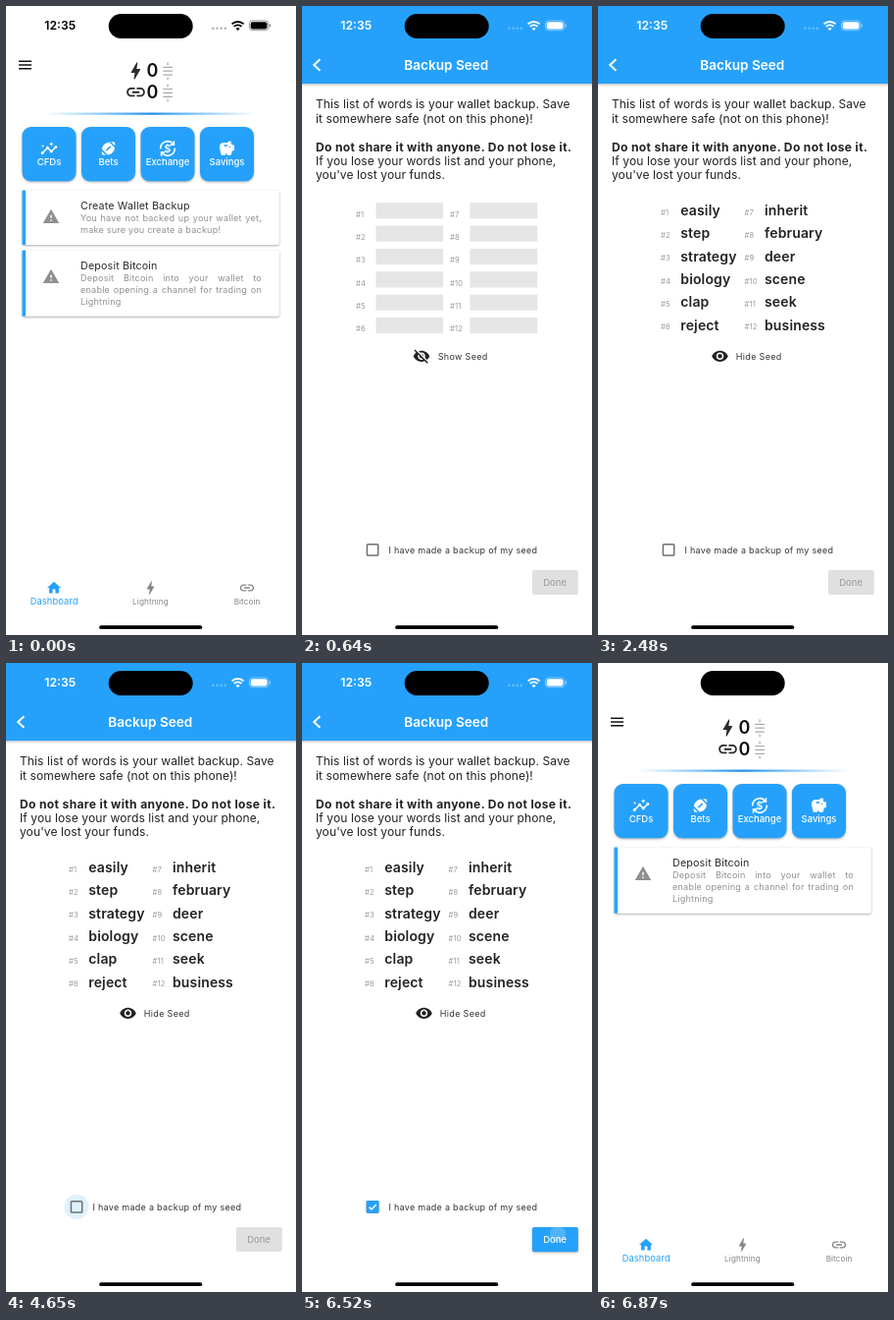
Animation of 296x640 px, one loop 7.97 s. Source, as an HTML page:

```html
<!DOCTYPE html>
<html lang="en">
<head>
<meta charset="utf-8">
<title>Wallet backup</title>
<style>
html, body { margin: 0; width: 100%; height: 100%; overflow: hidden; background: #fff; }
svg { display: block; width: 296px; height: 640px; font-family: Inter, Roboto, sans-serif; }
.body { font: 9.1px/11.7px Inter, Roboto, sans-serif; letter-spacing: .2px; color: #919191; }
.body p { margin: 0; text-align: justify; text-align-last: justify; }
.body p:last-child { text-align-last: left; }
.tile { filter: drop-shadow(0 1px 1.2px rgba(0,0,0,.32)); }
.card { filter: drop-shadow(.3px 1px 1px rgba(0,0,0,.33)); }
.bar { filter: drop-shadow(0 1.5px 1.5px rgba(0,0,0,.28)); }
</style>
</head>
<body>
<svg id="stage" viewBox="0 0 296 640"></svg>
<script>
const BLUE = '#26a1fb', INK = '#2b2b2b', GREY = '#909090';
const LOOP = 7970;

const ICONS = {
  trend: 'M21 8c-1.45 0-2.26 1.44-1.93 2.51l-3.55 3.56c-.3-.09-.74-.09-1.04 0l-2.55-2.55C12.27 10.45 11.46 9 10 9c-1.45 0-2.27 1.44-1.93 2.52l-4.56 4.55C2.44 15.74 1 16.55 1 18c0 1.1.9 2 2 2 1.45 0 2.26-1.44 1.93-2.51l4.55-4.56c.3.09.74.09 1.04 0l2.55 2.55C12.73 16.55 13.54 18 15 18c1.45 0 2.27-1.44 1.93-2.52l3.56-3.55C21.56 12.26 23 11.45 23 10c0-1.1-.9-2-2-2zM15 9l.94-2.07L18 6l-2.06-.93L15 3l-.92 2.07L12 6l2.08.93zM3.5 11L4 9l2-.5L4 8l-.5-2L3 8l-2 .5L3 9z',
  ball: 'M3.02 15.62c-.08 2.42.32 4.34.67 4.69s2.28.76 4.69.67l-5.36-5.36zM13.08 3.28C10.75 3.7 8.29 4.62 6.46 6.46s-2.76 4.29-3.18 6.62l7.63 7.63c2.34-.41 4.79-1.34 6.62-3.18s2.76-4.29 3.18-6.62l-7.63-7.63zM9.9 15.5l-1.4-1.4 5.6-5.6 1.4 1.4-5.6 5.6zM20.98 8.38c.08-2.42-.32-4.34-.67-4.69s-2.28-.76-4.69-.67l5.36 5.36z',
  pig: 'M19.83 7.5l-2.27-2.27c.07-.42.18-.81.32-1.15.08-.18.12-.37.12-.58 0-.83-.67-1.5-1.5-1.5-1.64 0-3.09.79-4 2h-5C4.46 4 2 6.46 2 9.5S4.5 21 4.5 21H10v-2h2v2h5.5l1.68-5.59 2.82-.94V7.5h-2.17zM13 9H8V7h5v2zm3 2c-.55 0-1-.45-1-1s.45-1 1-1 1 .45 1 1-.45 1-1 1z',
  warn: 'M1 21h22L12 2 1 21zm12-3h-2v-2h2v2zm0-4h-2v-4h2v4z',
  bolt: 'M11 21h-1l1-7H7.5c-.58 0-.57-.32-.38-.66l.07-.12C8.48 10.94 10.42 7.54 13 3h1l-1 7h3.5c.49 0 .56.33.47.51l-.07.15C12.96 17.55 11 21 11 21z',
  link: 'M3.9 12c0-1.71 1.39-3.1 3.1-3.1h4V7H7c-2.76 0-5 2.24-5 5s2.24 5 5 5h4v-1.9H7c-1.71 0-3.1-1.39-3.1-3.1zM8 13h8v-2H8v2zm9-6h-4v1.9h4c1.71 0 3.1 1.39 3.1 3.1s-1.39 3.1-3.1 3.1h-4V17h4c2.76 0 5-2.24 5-5s-2.24-5-5-5z',
  home: 'M10 20v-6h4v6h5v-8h3L12 3 2 12h3v8z',
  eye: 'M12 4.5C7 4.5 2.73 7.61 1 12c1.73 4.39 6 7.5 11 7.5s9.27-3.11 11-7.5c-1.73-4.39-6-7.5-11-7.5zM12 17c-2.76 0-5-2.24-5-5s2.24-5 5-5 5 2.24 5 5-2.24 5-5 5zm0-8c-1.66 0-3 1.34-3 3s1.34 3 3 3 3-1.34 3-3-1.34-3-3-3z',
  eyeOff: 'M12 7c2.76 0 5 2.24 5 5 0 .65-.13 1.26-.36 1.83l2.92 2.92c1.51-1.26 2.7-2.89 3.43-4.75-1.73-4.39-6-7.5-11-7.5-1.4 0-2.74.25-3.98.7l2.16 2.16C10.74 7.13 11.35 7 12 7zM2 4.27l2.28 2.28.46.46C3.08 8.3 1.78 10.02 1 12c1.73 4.39 6 7.5 11 7.5 1.55 0 3.03-.3 4.38-.84l.42.42L19.73 22 21 20.73 3.27 3 2 4.27zM7.53 9.8l1.55 1.55c-.05.21-.08.43-.08.65 0 1.66 1.34 3 3 3 .22 0 .44-.03.65-.08l1.55 1.55c-.67.33-1.41.53-2.2.53-2.76 0-5-2.24-5-5 0-.79.2-1.53.53-2.2zm4.31-.78l3.15 3.15.02-.16c0-1.66-1.34-3-3-3l-.17.01z'
};

const icon = (name, cx, cy, fill, k = .753) =>
  `<path d="${ICONS[name]}" fill="${fill}" transform="translate(${cx} ${cy}) scale(${k}) translate(-12 -12)"/>`;

const text = (s, x, y, size, fill, { w = 400, ls = 0, mid = false } = {}) =>
  `<text x="${x}" y="${y}" font-size="${size}" font-weight="${w}" fill="${fill}"
    letter-spacing="${ls}" text-anchor="${mid ? 'middle' : 'start'}">${s}</text>`;

const rect = (x, y, w, h, fill, r = 0, more = '') =>
  `<rect x="${x}" y="${y}" width="${w}" height="${h}" rx="${r}" fill="${fill}" ${more}/>`;

const group = (id, inner) => `<g id="${id}">${inner}</g>`;

const satSign = y =>
  `<path d="M160.3 ${y - 3.7}h9.6m-9.6 3.9h9.6m-9.6 3.9h9.6M165.1 ${y - 8.8}v3m0 12v3" stroke="#a9a9a9" stroke-width="1.2"/>`;

const swap = (cx, cy) => {
  const arrow = '<path d="M3 12.5A9 9 0 0 1 19 6.3M20 2.3V7.3h-5" fill="none" stroke="#fff" stroke-width="2"/>';
  return `<g transform="translate(${cx} ${cy}) scale(.8) translate(-12 -12)">${arrow}
    <g transform="rotate(180 12 12)">${arrow}</g>${text('$', 12, 16.6, 13, '#fff', { w: 600, mid: true })}</g>`;
};

const tile = (label, i, mark) => {
  const x = 16.5 + i * 60.5, c = x + 27.5;
  return rect(x, 123, 55, 55.3, BLUE, 9, 'class="tile"') +
    (mark ? icon(mark, c, 145, '#fff') : swap(c, 145)) +
    text(label, c, 162.3, 9.5, '#fff', { w: 500, mid: true });
};

const card = (id, y, h, title, lines) => group(id,
  rect(16.5, y, 262.5, h, '#fff', 2, 'class="card"') +
  rect(16.5, y, 3.6, h, BLUE, 1) +
  icon('warn', 46, y + 26.6, GREY) +
  text(title, 76, y + 19.7, 10.7, INK, { ls: .17 }) +
  `<foreignObject x="76" y="${y + 22.5}" width="185" height="40"><div xmlns="http://www.w3.org/1999/xhtml" class="body">${
    lines.map(l => `<p>${l}</p>`).join('')}</div></foreignObject>`);

const dashboard = () =>
  rect(0, 0, 296, 640, '#fff') +
  `<path d="M13 56.2h13m-13 3.8h13m-13 3.8h13" stroke="#111" stroke-width="1.5"/>` +
  icon('bolt', 132.4, 66, INK, .95) + text('0', 149.5, 72.3, 18, '#111', { w: 600, mid: true }) + satSign(66) +
  icon('link', 132.5, 87.7, INK, .93) + text('0', 149.5, 94.2, 18, '#111', { w: 600, mid: true }) + satSign(88.2) +
  rect(40, 108.4, 216, 2.3, 'url(#line)', 1) +
  tile('CFDs', 0, 'trend') + tile('Bets', 1, 'ball') + tile('Exchange', 2) + tile('Savings', 3, 'pig') +
  card('backupCard', 187.6, 55.5, 'Create Wallet Backup',
    ['You have not backed up your wallet yet,', 'make sure you create a backup!']) +
  card('depositCard', 248.6, 67.2, 'Deposit Bitcoin',
    ['Deposit Bitcoin into your wallet to', 'enable opening a channel for trading on', 'Lightning']) +
  icon('home', 49, 592, BLUE, .7) + text('Dashboard', 49.2, 609, 9.3, BLUE, { ls: .12, mid: true }) +
  icon('bolt', 147.5, 592, '#858585') + text('Lightning', 147.5, 609, 8.2, '#858585', { ls: .12, mid: true }) +
  icon('link', 246, 592, '#858585', .72) + text('Bitcoin', 246, 609, 8.2, '#858585', { ls: .05, mid: true });

const WORDS = 'easily step strategy biology clap reject inherit february deer scene seek business'.split(' ');

const seedList = shown => WORDS.map((word, i) => {
  const right = i > 5, y = (i % 6) * 23.35;
  const tag = (x, base) => text('#' + (i + 1), x, base + y, 7.6, '#999', { ls: .12 });
  return shown
    ? tag(right ? 149.5 : 64, 212.7) + text(word, right ? 170 : 84.3, 213 + y, 14, '#222', { w: 600, ls: .13 })
    : tag(right ? 151 : 55, 214.7) + rect(right ? 171.5 : 75.5, 200.2 + y, 68.7, 16.2, '#e5e5e5');
}).join('');

const seedPage = () => {
  const para = (s, row, w = 400, ls = .085) => text(s, 14, 104.3 + row * 14.4, 12.05, '#222', { w, ls });
  return rect(0, 0, 296, 640, '#fff') +
    rect(-2, -5, 300, 84, BLUE, 0, 'class="bar"') +
    `<path d="M18.4 54.2L12.2 60l6.2 5.8" fill="none" stroke="#fff" stroke-width="2"/>` +
    text('Backup Seed', 147.3, 64.8, 13.6, '#fff', { w: 600, mid: true }) +
    para('This list of words is your wallet backup. Save', 0) +
    para('it somewhere safe (not on this phone)!', 1) +
    para('Do not share it with anyone. Do not lose it.', 3, 700, .35) +
    para('If you lose your words list and your phone,', 4) +
    para("you've lost your funds.", 5) +
    group('hidden', seedList(false) + icon('eyeOff', 122, 356.3, '#222') +
      text('Show Seed', 138.7, 359.6, 9, '#333', { ls: .33 })) +
    group('shown', `<circle id="eyeRipple" cx="125" cy="356.3" r="11.2" fill="#ececec"/>` +
      seedList(true) + icon('eye', 124.5, 356.3, '#222') +
      text('Hide Seed', 140.8, 359.6, 9, '#333', { ls: .33 })) +
    `<circle id="boxRipple" cx="72" cy="553.3" r="12.5" fill="#dff1fd"/>` +
    rect(66.4, 547.7, 11.3, 11.3, 'none', .8, 'stroke="#707070" stroke-width="1.5"') +
    group('tick', rect(65.7, 547, 12.7, 12.7, BLUE, 1) +
      `<path d="M68.6 553.6l2.4 2.4 4.8-5" fill="none" stroke="#fff" stroke-width="1.5"/>`) +
    text('I have made a backup of my seed', 88.5, 556.6, 9, '#333', { ls: .28 }) +
    rect(235, 574, 46.8, 25, '#e0e0e0', 2) +
    text('Done', 258.2, 590, 9.6, '#a2a2a2', { w: 500, mid: true }) +
    group('ready', rect(235, 574, 46.8, 25, BLUE, 2, 'class="tile"') +
      `<circle id="press" cx="261" cy="581" fill="#fff" opacity=".2"/>` +
      text('Done', 258.2, 590, 9.6, '#fff', { w: 500, mid: true }));
};

const statusBar = () => group('status',
  text('12:35', 55.2, 24.4, 12.2, 'currentColor', { w: 600, mid: true }) +
  [0, 1, 2, 3].map(i => `<circle cx="${211.5 + i * 4.1}" cy="22.8" r="1.2" fill="currentColor" opacity=".32"/>`).join('') +
  `<path d="M230.6 18.4a8.6 8.6 0 0 1 12 0M232.8 20.9a5.4 5.4 0 0 1 7.6 0" fill="none" stroke="currentColor" stroke-width="1.9"/>
   <path d="M236.6 25l-2-2.1a2.8 2.8 0 0 1 4 0z" fill="currentColor"/>` +
  rect(248.4, 14.9, 19.4, 9.8, 'none', 3, 'stroke="currentColor" stroke-width=".9" opacity=".45"') +
  rect(249.7, 16.2, 16.8, 7.2, 'currentColor', 2) +
  rect(268.8, 18.2, 1.2, 3.4, 'currentColor', .6, 'opacity=".5"'));

document.getElementById('stage').innerHTML =
  `<defs><linearGradient id="line"><stop stop-color="${BLUE}" stop-opacity="0"/>
   <stop offset=".5" stop-color="#1f8fea"/><stop offset="1" stop-color="${BLUE}" stop-opacity="0"/></linearGradient></defs>` +
  group('dash', dashboard()) + group('seed', seedPage()) + statusBar() +
  rect(104.7, 8, 86, 25, '#000', 12.5) + rect(95.2, 630.3, 105, 3.8, '#000', 1.9);

const $ = id => document.getElementById(id);
const show = (id, on) => $(id).style.display = on ? '' : 'none';
const fade = (id, a) => $(id).style.opacity = a;

// Screen recording: states hold until the next step.
const STEPS = [
  [0, { gap: 0, dark: true }],
  [500, { dark: false }],
  [640, { gap: 296 }],
  [2370, { shown: true, eye: 1 }],
  [2480, { eye: 0 }],
  [4650, { box: 1 }],
  [4770, { tick: true, box: .6, ready: .75 }],
  [4880, { box: 0, ready: 1 }],
  [6400, { press: 4 }],
  [6520, { press: 8 }],
  [6630, { gap: 24, saved: true }],
  [6760, { gap: 2 }],
  [6870, { gap: 0 }]
];
const START = { eye: 0, box: 0, ready: 0, press: 0, shown: false, tick: false, saved: false };

function draw(t) {
  const s = Object.assign({}, START, ...STEPS.filter(step => step[0] <= t).map(step => step[1]));
  // The lower page trails at a third of the upper page's speed.
  $('dash').setAttribute('transform', `translate(${-s.gap / 3} 0)`);
  $('seed').setAttribute('transform', `translate(${296 - s.gap} 0)`);
  show('dash', s.gap < 296);
  show('seed', s.gap > 0);
  $('status').style.color = s.dark ? '#000' : '#fff';
  show('backupCard', !s.saved);
  $('depositCard').setAttribute('transform', `translate(0 ${s.saved ? -61 : 0})`);
  show('hidden', !s.shown);
  show('shown', s.shown);
  fade('eyeRipple', s.eye);
  fade('boxRipple', s.box);
  show('tick', s.tick);
  fade('ready', s.ready);
  $('press').setAttribute('r', s.press);
}

const begin = performance.now();
function tick() {
  draw((performance.now() - begin) % LOOP);
  requestAnimationFrame(tick);
}
tick();
</script>
</body>
</html>
```
